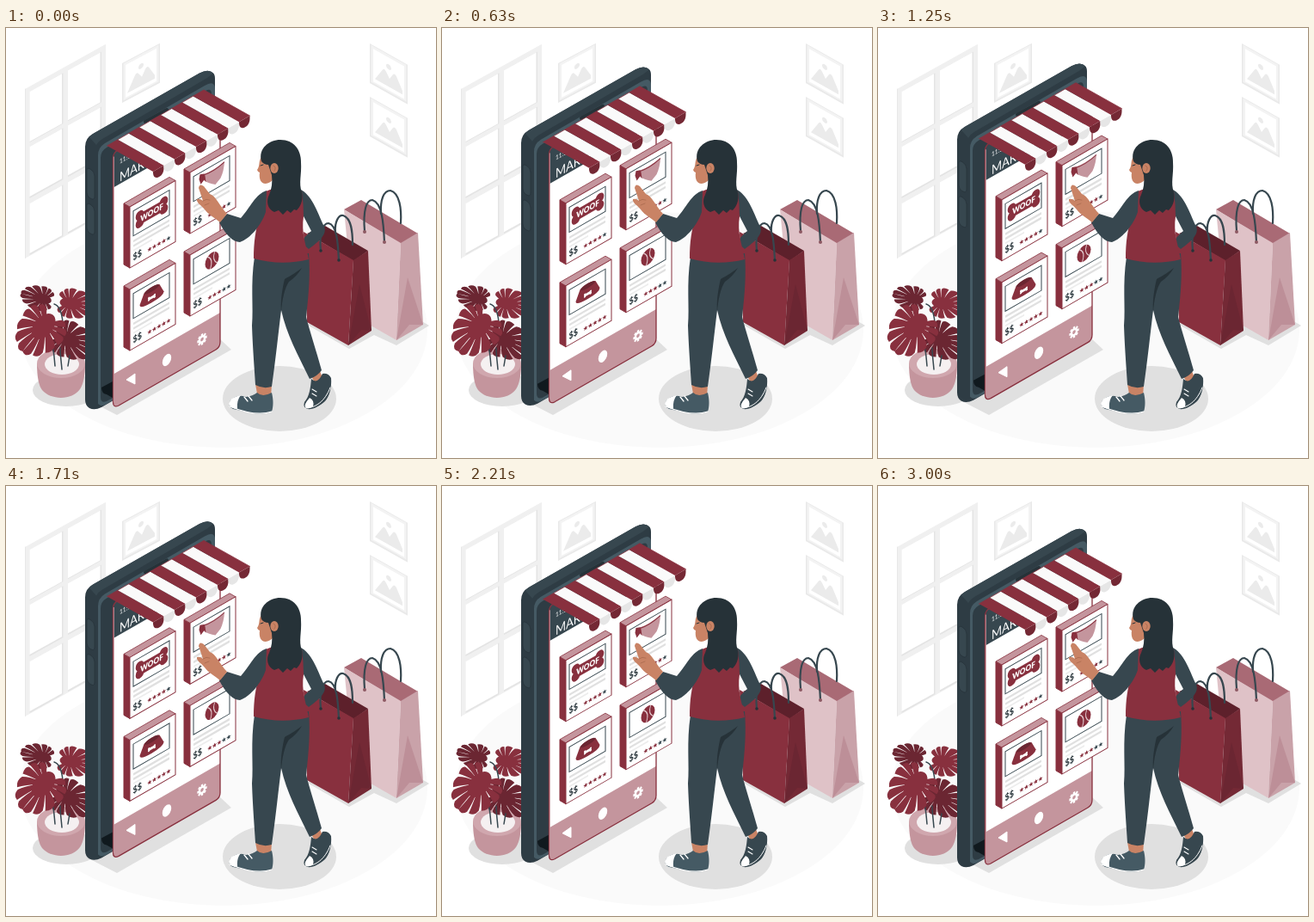
An HTML page for the animation above (3040 ms loop, 500x500 px).

```html
<!DOCTYPE html>
<html lang="en">
<head>
<meta charset="utf-8">
<title>Market app</title>
<style>
  html, body { margin: 0; width: 100%; height: 100%; overflow: hidden; background: #fff; }
  svg { display: block; width: 100%; height: 100%; }
  text { font-family: Lato, "Open Sans", sans-serif; }
</style>
</head>
<body>
<svg id="stage" viewBox="0 0 500 500"></svg>
<script>
const RED = '#88303e', DEEP = '#6b2632', ROSE = '#c4959d', PALE = '#dfc2c7';
const INK = '#263238', SLATE = '#37474f', STEEL = '#455a64', SKIN = '#c98365';
const SHADE = '#e0e0e0', WALL = '#f0f0f0';
const LOOP = 3040, FLOAT = 3000, LIFT = 10, SLOPE = 0.577;

const path = (d, fill, extra = '') => `<path d="${d}" fill="${fill}" ${extra}/>`;
const line = (d, color, width) =>
  path(d, 'none', `stroke="${color}" stroke-width="${width}" stroke-linecap="round" stroke-linejoin="round"`);
const oval = (x, y, rx, ry, fill) => `<ellipse cx="${x}" cy="${y}" rx="${rx}" ry="${ry}" fill="${fill}"/>`;
const plane = (x, y, inner, slope = -SLOPE) =>
  `<g transform="matrix(1 ${slope} 0 1 ${x} ${y})">${inner}</g>`;
// Isometric projection of a wall facing right.
const iso = (x, y, inner) => `<g transform="matrix(.866 -.5 0 1 ${x} ${y})">${inner}</g>`;
const rect = (x, y, w, h, fill, extra = '') =>
  `<rect x="${x}" y="${y}" width="${w}" height="${h}" fill="${fill}" ${extra}/>`;

function windowFrame() {
  let panes = '';
  for (const x of [5.5, 50]) {
    for (const y of [6, 70, 136]) {
      panes += rect(x, y, 39, y === 6 ? 59 : 60, '#e4e4e4') + rect(x, y, 37.5, 58, '#fff');
    }
  }
  return plane(22, 71, rect(0, 0, 94, 197, WALL) + rect(0, 0, 1, 197, '#e8e8e8') + panes, -0.555);
}

function picture(x, y, slope) {
  return plane(x, y,
    rect(0, 0, 44, 46, '#e9e9e9') + rect(1.5, 1, 41, 43, '#f3f3f3') +
    rect(4, 4, 36, 38, '#fff') +
    path('M6 38L15 22Q17 19 19 22L23 28L27 21Q29 18 31 21L38 34V38Z', '#ebebeb') +
    oval(22, 15, 3, 3, '#ebebeb'), slope);
}

// A split leaf pointing along +x: a core with curved fingers fanning out of it.
function leaf(x, y, length, width, angle, fill) {
  const fingers = 6, step = 2.75 / fingers;
  const at = (t, k, side) =>
    `${(length * (0.33 + k * Math.cos(t) * (Math.cos(t) > 0 ? 0.68 : 0.36))).toFixed(1)} ` +
    `${(side * k * width * Math.sin(t)).toFixed(1)}`;
  let d = '';
  for (const side of [1, -1]) {
    for (let i = 0; i < fingers; i++) {
      const t = i * step, end = t + step * 0.8;
      d += `M${at(t, 0.2, side)}Q${at(t + 0.04, 0.7, side)} ${at(t, 1, side)}` +
        `Q${at(t + step * 0.5, 1.12, side)} ${at(end, 0.96, side)}` +
        `Q${at(end + 0.1, 0.7, side)} ${at(end + 0.1, 0.2, side)}Z`;
    }
  }
  return `<g transform="translate(${x} ${y}) rotate(${angle})">` +
    path(d, fill) + oval(length * 0.36, 0, length * 0.3, width * 0.4, fill) + '</g>';
}

function plant() {
  return oval(70, 421, 39, 19, SHADE) +
    leaf(55, 318, 38, 14, 194, DEEP) +
    leaf(60, 318, 44, 17, 8, RED) +
    path('M36 390C36 405 38 416 42 421C52 433 77 433 86 420C90 414 92 404 92 390Z', ROSE) +
    oval(64, 390, 28, 17, '#d0a7ae') + oval(65, 391, 20, 12, '#f5f0f1') +
    leaf(54, 354, 52, 21, 24, DEEP) +
    line('M57 393C56 383 56 377 54 371M65 397C64 385 63 380 63 372M72 393L74 381M56 321C63 323 65 332 66 342', SLATE, 1.5) +
    leaf(57, 331, 58, 27, 130, RED);
}

function star(x, y, fill) {
  let d = '';
  for (let i = 0; i < 10; i++) {
    const r = i % 2 ? 1.2 : 2.8, a = i * Math.PI / 5 - Math.PI / 2;
    d += (i ? 'L' : 'M') + (x + r * Math.cos(a)).toFixed(2) + ' ' + (y + r * Math.sin(a)).toFixed(2);
  }
  return path(d + 'Z', fill);
}

const bone = fill => rect(-14, -6.5, 28, 13, fill) +
  [-14, 14].map(x => oval(x, -4.5, 4.8, 5.4, fill) + oval(x, 4.5, 4.8, 5.4, fill)).join('');

const products = {
  bone: bone(RED) + '<text transform="scale(.866 1)" y="3.4" text-anchor="middle" font-size="9.5" font-weight="900" fill="#fff">WOOF</text>',
  bandana: path('M-10 -10Q2 -7 14.5 -11Q14 0 10 6L4 10Q-4 4 -9 -2Z', ROSE) +
    line('M-10 -9Q2 -6 14 -10', RED, 1.2) +
    path('M-9 -10L-14 -12L-15 -7L-13 0L-9 -3L-7 1L-8 -7Z', RED),
  bowl: path('M-9 -7Q0 -11 9 -7L14 4Q14 9 0 9Q-14 9 -14 4Z', RED) + oval(0, -6.5, 8.5, 2.8, DEEP) +
    `<g transform="translate(0 3) scale(.24)">${bone('#fff')}</g>`,
  ball: oval(0, 0, 8, 9.2, RED) + line('M-5 -7Q2 -1 -2 9M3 -8Q0 0 6 6', '#e4cdd1', 1)
};

function card(x, y, product, rating) {
  let stars = '';
  for (let i = 0; i < 5; i++) stars += star(23 + i * 5.5, 62.5, i < rating ? RED : SLATE);
  const front = rect(0, 0, 53, 71, '#fff', `stroke="${RED}" stroke-width="1"`) +
    rect(4, 7, 42, 29, '#fff', `stroke="${SLATE}" stroke-width="1"`) +
    `<g transform="translate(25.5 21)">${products[product]}</g>` +
    rect(4, 41, 42, 2.6, SHADE) + rect(4, 46.5, 42, 2.6, SHADE) + rect(4, 52, 22, 2, '#ededed') +
    `<text transform="translate(3.5 64.5) scale(.866 1)" font-size="10.5" font-weight="700" fill="${INK}">$$</text>` + stars;
  return `<g transform="translate(${x} ${y})">` +
    path('M-7 -4L0 0V71L-7 67Z', RED, `stroke="${RED}"`) +
    path('M-7 -4L46 -34.6L53 -30.6L0 0Z', ROSE, `stroke="${RED}" stroke-width=".8"`) +
    plane(0, 0, front) + '</g>';
}

function awning() {
  const count = 9, left = 117.5, top = 137, dx = 112.5 / count, dy = -65 / count;
  let out = '';
  for (let i = 0; i < count; i++) {
    const x = left + i * dx, y = top + i * dy, fx = x + 53.5, fy = y + 30;
    const red = i % 2 === 0;
    out += path(`M${fx} ${fy}l${dx} ${dy}v3c0 7 -4 10 -7 11c-4 1 -5.5 -2 -5.5 -6Z`, red ? '#742834' : '#e6e6e6') +
      path(`M${x} ${y}l${dx} ${dy}L${fx + dx} ${fy + dy}l${-dx} ${-dy}Z`, red ? RED : '#fafafa');
  }
  return out + line(`M${left} ${top}l112.5 -65l53.5 30`, RED, 0.8);
}

function gear() {
  let teeth = '';
  for (let a = 0; a < 180; a += 45) teeth += rect(-1.4, -6.5, 2.8, 13, '#fff', `transform="rotate(${a})"`);
  return teeth + oval(0, 0, 4.7, 4.7, '#fff') + oval(0, 0, 2.1, 2.1, ROSE);
}

function phone() {
  const screen = 'M124.5 151Q124.5 145 130 142L225 90L249 103V365Q249 371 244 374L131 439Q124.5 442 124.5 435Z';
  return path('M92 138Q92 128 101 123L225 52.5Q235 47 241 52.5Q243 54 243 59V365L111 441Q103 445 97 442Q92 439 92 432Z', '#2e3c44') +
    path('M107 148Q107 139 115 134L231 67Q243 60 243 71V365L117 437Q111 441 107 437Z', STEEL) +
    path('M97 127Q99 124 103 122L225 52.5Q236 47 241 52.5L234 58L112 129Q107 132 105 136Z', SLATE) +
    path('M110 151Q110 143 117 139L232 73Q239 69 239 77V365L117 434Q110 437 110 429Z', '#2e3c44') +
    path('M111 418L124 411V430L117 426Q111 425 111 418Z', '#10191e') +
    line('M162 109L187 95', INK, 4) +
    [165, 206].map(y => path(`M94 ${y}Q94 ${y - 3} 98 ${y - 1}Q103 ${y + 2} 103 ${y + 7}V${y + 31}Q103 ${y + 36} 98 ${y + 33}Q94 ${y + 31} 94 ${y + 26}Z`, SLATE, `stroke="${INK}" stroke-width=".7"`)).join('') +
    `<clipPath id="screen"><path d="${screen}"/></clipPath><g clip-path="url(#screen)">` +
    path(screen, '#fff') +
    path('M124 130L250 58V114L124 186Z', SLATE) +
    path('M124 403L250 330.5V380L124 450Z', ROSE) + '</g>' +
    line(screen, RED, 1.3) + line('M125.3 150V435', ROSE, 1) +
    iso(132, 158, '<text font-size="7.5" fill="#fff">11:50</text>') +
    iso(132, 179, '<text font-size="15" fill="#fff">MARKET</text>') +
    path('M140 409L150 402V414Z', '#fff', 'stroke="#fff" stroke-linejoin="round"') +
    plane(187, 386, oval(0, 0, 5.2, 6.6, '#fff')) +
    iso(228, 362, gear()) +
    card(214, 168, 'bandana', 4) + card(214, 264, 'ball', 3) +
    card(144, 208, 'bone', 4) + card(144, 304, 'bowl', 5) + awning();
}

function bags() {
  return path('M350 345L399 373L428 357L454 369L492 346L470 333L380 325Z', SHADE) +
    path('M393 211L413 200L479 239L459 251Z', '#a96a75') +
    path('M393 211L459 250L454 363L405 335Z', PALE) +
    path('M459 250L479 238L485 345L454 363Z', '#c9a2a9') +
    path('M467 290L485 345L469 345L454 363Z', '#bd8f98') +
    line('M417 236C415 212 419 200 426 200C437 203 439 226 440 249M436 216C435 200 439 189 447 189C458 192 460 211 459 227', SLATE, 2.2) +
    oval(417, 237, 2, 2, '#8d5963') + oval(440, 249, 2, 2, '#8d5963') +
    path('M350 239L371 230L421 259L404 271Z', '#5d202b') +
    path('M346 237L404 270L398 369L350 342Z', RED) +
    path('M404 270L421 259L425 352L398 369Z', '#742935') +
    path('M411 298L425 352L413 351L398 369Z', DEEP) +
    line('M366 259C364 240 368 227 375 227C385 229 386 251 387 270M383 237C382 225 387 217 392 218C402 221 403 238 403 252', SLATE, 2.2) +
    oval(366, 259, 1.8, 1.8, INK) + oval(387, 270, 1.8, 1.8, INK);
}

function woman() {
  return oval(318, 431, 66, 38, SHADE) +
    path('M354 402L364 396L368 407L359 413Z', SKIN) +
    path('M290 414H309L308 430L293 431Z', SKIN) +
    // shoes
    path('M368 402Q375 401 378 407C379 417 376 429 371 434C364 440 357 444 350 443Q345 441 347 435C353 428 354 419 355 408Q362 415 368 402Z', SLATE) +
    path('M353 430Q359 433 357 440Q351 444 348 441Q346 438 353 430Z', '#fff') +
    line('M348 442C360 442 371 434 377 418', '#fff', 1) +
    line('M356 425L361 428M356 420L361 423', '#fff', 1.1) +
    path('M292 424Q298 430 309 424C311 432 311 440 309 446Q298 451 283 447L264 443Q257 440 261 433Q269 425 279 429Q287 428 292 424Z', STEEL) +
    path('M273 427Q268 433 269 443Q260 442 259 437Q261 429 273 427Z', '#fff') +
    line('M260 440C275 446 295 451 309 446', '#fff', 1.3) +
    line('M277 429L281 434M282 428L286 433', '#fff', 1.3) +
    // trousers
    path('M289 266C284 298 288 325 286 346C287 375 289 397 290 415Q299 420 309 417C313 390 317 352 320 328C326 356 340 381 353 408Q362 405 367 398C361 376 353 352 349 336C352 310 354 286 352 262Z', SLATE) +
    path('M344 279C335 286 329 289 324 292C321 304 319 318 320 330C321 316 324 302 329 295Q338 289 344 279Z', INK) +
    // far arm, vest, pointing arm
    path('M341 187C356 194 361 212 370 231C374 240 363 249 352 257L344 250C346 243 351 240 355 236L344 215Z', SLATE) +
    path('M302 190Q322 181 344 190Q346 205 346 219C343 238 349 252 352 269Q320 277 288 268C288 250 290 233 296 216Z', RED) +
    path('M303 189C290 193 284 209 273 221L257 216L248 226C255 240 264 249 272 249C284 245 297 229 302 214Z', SLATE) +
    path('M249 226C242 220 235 217 231 211C227 206 221 203 222 199Q226 198 229 201L224 186Q225 180 230 184L237 193C244 195 249 208 257 216Z', SKIN) +
    line('M229 201Q233 198 237 200M231 206L236 204', '#a5664b', 0.7) +
    // head
    path('M297 150C293 156 296 159 292 165Q293 168 295 168C294 175 296 181 302 181Q308 180 313 174L318 150Z', SKIN) +
    path('M297 155C293 140 306 130 319 130C335 130 343 142 343 156C344 171 340 180 344 191C346 201 342 208 338 212L335 211L331 215L327 212L322 217L317 212L312 214C304 211 302 201 306 194C309 187 310 179 309 171L305 159Q300 159 297 155Z', INK) +
    oval(312, 163, 4.7, 6, SKIN) + line('M311 160Q315 162 312 166', '#a5664b', 0.8) +
    line('M296 160L299 159', INK, 1);
}

document.getElementById('stage').innerHTML =
  oval(253, 351, 237, 137, '#fafafa') + windowFrame() +
  picture(135, 41, -0.53) + picture(423, 18, 0.56) + picture(423, 80, 0.56) +
  path('M90 430L129 450L262 374L248 361L120 425Z', SHADE) +
  plant() + `<g id="phone">${phone()}</g>` + bags() + woman();

const device = document.getElementById('phone');
let start;
function draw(now) {
  start ??= now;
  const phase = Math.min(((now - start) % LOOP) / FLOAT, 1);
  const rise = LIFT * (1 - Math.abs(1 - 2 * phase));
  device.setAttribute('transform', `translate(0 ${-rise.toFixed(3)})`);
  requestAnimationFrame(draw);
}
requestAnimationFrame(draw);
</script>
</body>
</html>
```
